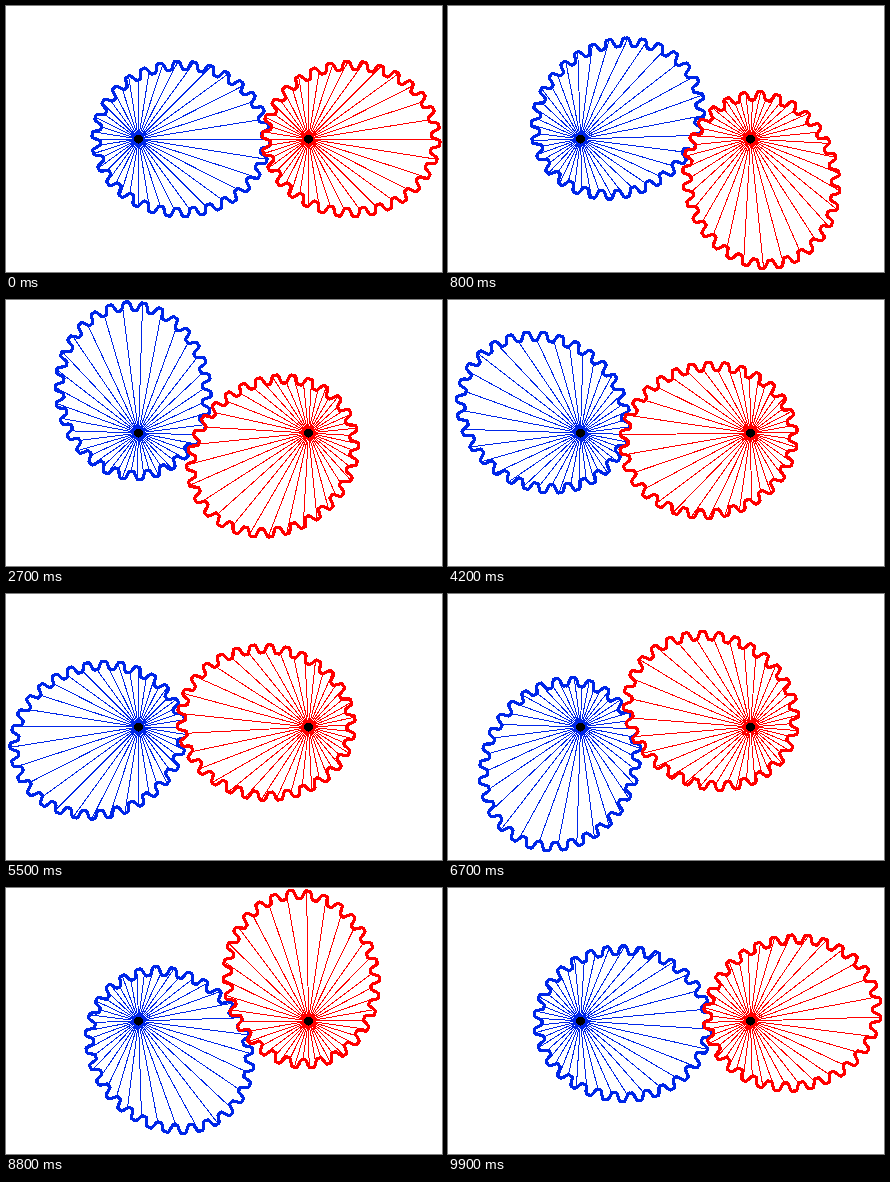
Recreate the animation shown at these times as an HTML page. Size 436 by 266 pixels, loop 10 s.

```html
<!DOCTYPE html>
<html>
<head>
<meta charset="utf-8">
<title>Elliptical gears</title>
<style>
html, body { margin: 0; width: 100%; height: 100%; overflow: hidden; background: #fff; }
svg { display: block; }
</style>
</head>
<body>
<svg id="stage" width="436" height="266" viewBox="0 0 436 266" shape-rendering="crispEdges"></svg>
<script>
const A = 85, ECC = 0.5, B = A * Math.sqrt(1 - ECC * ECC);
const TEETH = 30, DEPTH = 4.8, SPOKES = 40;
const STEP = 100, STEPS = 100;
const stage = document.getElementById('stage');
const point = (x, y) => x.toFixed(2) + ' ' + (-y).toFixed(2);

// Height of the steep, flat-topped teeth at eccentric anomaly e.
function tooth(e) {
  const phase = TEETH * (e - 0.0359 * Math.sin(2 * e)); // nearly proportional to arc length
  return -DEPTH * (Math.sin(phase) + Math.sin(3 * phase) / 6);
}

// Teeth stand at right angles to the ellipse; the origin is the focus with the axle.
function outline() {
  const points = [];
  for (let i = 0; i < 900; i++) {
    const e = i * Math.PI / 450, cos = Math.cos(e), sin = Math.sin(e);
    const k = tooth(e) / Math.hypot(B * cos, A * sin);
    points.push(point(A * (ECC + cos) + k * B * cos, B * sin + k * A * sin));
  }
  return 'M' + points.join('L') + 'Z';
}

function spokes() {
  let d = '';
  for (let i = 0; i < SPOKES; i++) {
    const half = i * Math.PI / SPOKES;
    const e = 2 * Math.atan2(Math.sqrt((1 + ECC) / (1 - ECC)) * Math.sin(half), Math.cos(half));
    const r = A * (1 + ECC * Math.cos(e)) + tooth(e);
    d += 'M0 0L' + point(r * Math.cos(2 * half), r * Math.sin(2 * half));
  }
  return d;
}

function gear(x, color) {
  stage.insertAdjacentHTML('beforeend', `<g transform="translate(${x} 133)">
    <g fill="none" stroke="${color}" stroke-linejoin="round">
      <path d="${spokes()}"/>
      <path d="${outline()}" stroke-width="3.2"/>
    </g>
    <circle r="4.5"/>
  </g>`);
  return stage.lastElementChild.firstElementChild;
}

const blue = gear(132.5, '#0026e8');
const red = gear(302.5, '#ff0000');

function draw() {
  const step = Math.floor(performance.now() / STEP) % STEPS;
  const half = Math.PI * step / STEPS;
  // Rolling contact couples the half angles by (1 + e) / (1 - e).
  const driven = 2 * Math.atan2((1 + ECC) / (1 - ECC) * Math.sin(half), Math.cos(half));
  blue.setAttribute('transform', `rotate(${-360 * step / STEPS})`);
  red.setAttribute('transform', `rotate(${driven * 180 / Math.PI})`);
  requestAnimationFrame(draw);
}
draw();
</script>
</body>
</html>
```
